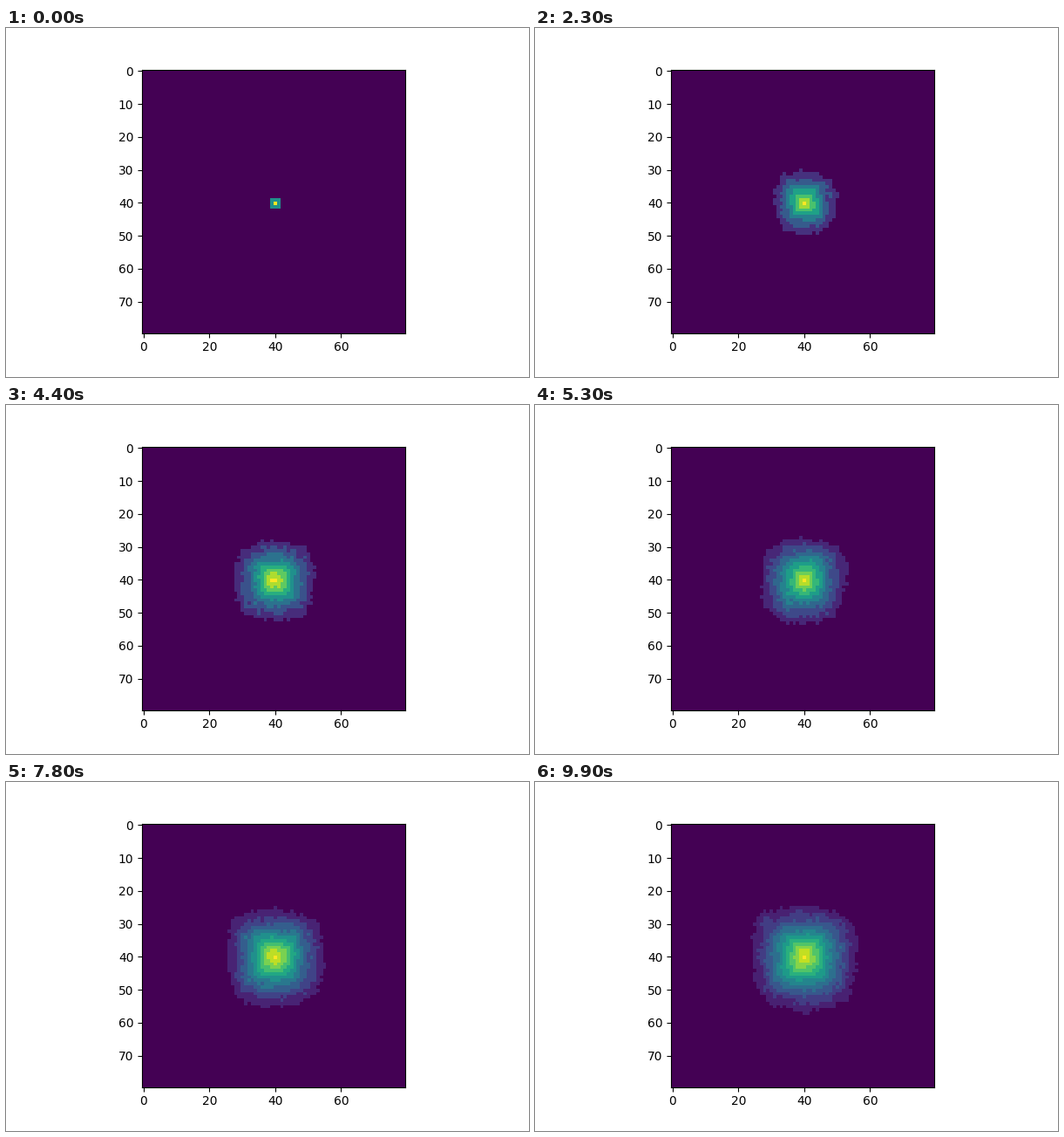
Animation, 600 px wide and 400 px high, one loop 10 s. Source, as a matplotlib script:

```python
import random

import numpy as np
import matplotlib.pyplot as plt
from matplotlib.animation import FuncAnimation

SIZE = 80
CENTER = SIZE // 2
FRAMES = 100
FIRST_GRAINS = 10
GRAINS_PER_FRAME = 30
SLIDE = 0.75  # chance that a rolling grain crosses a flat spot
MOORE = [(dy, dx) for dy in (-1, 0, 1) for dx in (-1, 0, 1) if dy or dx]

rng = random.Random(7)


def drop(pile):
    """Release a grain at the centre and let it roll until it rests."""
    y = x = CENTER
    rolling = False
    while True:
        height = pile[y][x]
        around = [(y + dy, x + dx) for dy, dx in MOORE]
        options = [(v, u) for v, u in around if pile[v][u] < height]
        if not options and rolling and height and rng.random() < SLIDE:
            options = [(v, u) for v, u in around if pile[v][u] == height]
        if not options:
            break
        y, x = rng.choice(options)
        rolling = True
    pile[y][x] += 1


def grow():
    pile = [[0] * SIZE for _ in range(SIZE)]
    states = []
    for n in range(FRAMES):
        for _ in range(GRAINS_PER_FRAME if n else FIRST_GRAINS):
            drop(pile)
        states.append(np.array(pile))
    return states


states = grow()

plt.rcParams.update({"font.family": "DejaVu Sans", "font.size": 10})
fig, ax = plt.subplots(figsize=(6, 4), dpi=100)
fig.subplots_adjust(left=0.1243, right=0.8993, bottom=0.126, top=0.881)
image = ax.imshow(states[0], cmap="viridis", interpolation="nearest")
ax.set_xticks(range(0, SIZE, 20))
ax.set_yticks(range(0, SIZE, 10))


def update(n):
    image.set_data(states[n])
    image.set_clim(0, states[n].max())
    return [image]


anim = FuncAnimation(fig, update, frames=FRAMES, interval=100,
                     repeat=True, repeat_delay=0)
plt.show()
```
